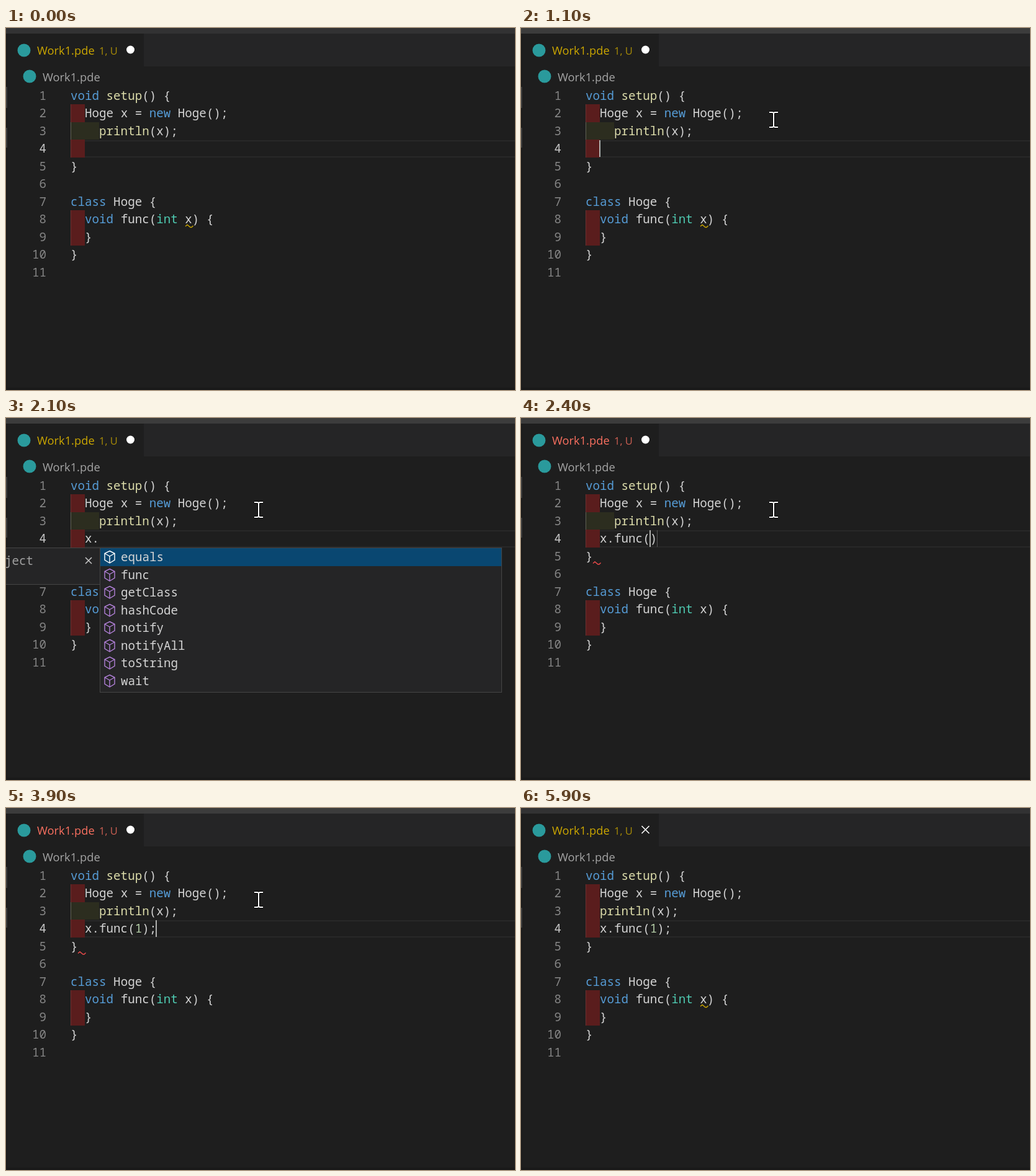
An HTML page with a canvas that plays this animation: 820x584 px, repeating every 6 s.

```html
<!DOCTYPE html>
<html lang="en">
<head>
<meta charset="utf-8">
<title>Code editor</title>
<style>
html, body { margin: 0; width: 100%; height: 100%; overflow: hidden; background: #1e1e1e; }
canvas { display: block; }
</style>
</head>
<body>
<canvas id="stage" width="820" height="584"></canvas>
<script>
const ctx = document.getElementById('stage').getContext('2d');
const LOOP = 6000, LEFT = 104, CHAR = 11.52, ROW = 28.5;
const MONO = '500 19.2px "Noto Sans Mono", monospace';
const UI = '"Open Sans", sans-serif';
const METHODS = ['equals', 'func', 'getClass', 'hashCode', 'notify', 'notifyAll', 'toString', 'wait'];
const TOKENS = /(void|class|new)\b|(setup|println)\b|(int)\b|(\d+)|[\w.]+|\s+|[^\w\s]/g;
const TOKEN_COLORS = ['#569cd6', '#dcdcaa', '#4ec9b0', '#b5cea8'];
const PLAIN = '#d4d4d4';

// Start time, text of line 4, caret column
const TYPING = [
  [0, '', 2],
  [1400, 'x', 3],
  [1500, 'x.', 4],
  [2400, 'x.func()', 9],
  [3200, 'x.func(1)', 10],
  [3800, 'x.func(1);', 12],
];
// Moments that restart the caret blink
const BLINK_STARTS = [900, 1400, 1500, 2400, 3200, 3800, 5000];

const rowTop = n => Math.floor(95 + ROW * (n - 1));
const during = (t, from, to) => t >= from && t < to;

function rect(x, y, w, h, color) {
  ctx.fillStyle = color;
  ctx.fillRect(x, y, w, h);
}

function text(str, x, y, color, font = MONO, align = 'left') {
  ctx.font = font;
  ctx.textAlign = align;
  ctx.fillStyle = color;
  ctx.fillText(str, x, y);
}

function disc(x, y, r, color) {
  ctx.fillStyle = color;
  ctx.beginPath();
  ctx.arc(x, y, r, 0, Math.PI * 2);
  ctx.fill();
}

function stroke(path, color, width) {
  ctx.strokeStyle = color;
  ctx.lineWidth = width;
  ctx.stroke(new Path2D(path));
}

function panel(x, y, w, h) {
  rect(x, y, w, h, '#454545');
  rect(x + 1, y + 1, w - 2, h - 2, '#252526');
}

const cross = (x, y, r, color) =>
  stroke(`M${x - r} ${y - r}l${2 * r} ${2 * r}m0 ${-2 * r}l${-2 * r} ${2 * r}`, color, 1.6);

const squiggle = (x, y, color) =>
  stroke(`M${x} ${y}l3 -2.5l5 4h2l2.5 -2.5`, color, 1.4);

function codeLine(n, str, column = 0) {
  const y = rowTop(n) + 21;
  text(n, 65, y, n === 4 ? '#c6c6c6' : '#858585', MONO, 'right');
  for (const m of str.matchAll(TOKENS)) {
    const kind = m.slice(1).findIndex(Boolean);
    text(m[0], LEFT + (column + m.index) * CHAR, y, TOKEN_COLORS[kind] || PLAIN);
  }
}

function chrome(t, saved, error) {
  const focused = during(t, 900, 5900);
  rect(0, 0, 820, 584, '#1e1e1e');
  rect(0, 0, 820, 9, focused ? '#3c3c3c' : '#323233');
  rect(222, 9, 598, 53, '#252526');
  rect(0, 9, 2, 575, '#191919');
  rect(0, 95, 2, 34, '#3c3c3c');
  rect(0, 161, 2, 32, '#3c3c3c');
  rect(0, 580, 820, 4, '#191919');

  const tabColor = error ? '#fa7060' : '#cca700';
  disc(29, 36, 10.5, '#2a9a9c');
  text('Work1.pde', 50, 43, tabColor, '18.3px ' + UI);
  ctx.globalAlpha = 0.8;
  text('1, U', 150, 43, tabColor, '16.5px ' + UI);
  ctx.globalAlpha = 1;
  if (saved) cross(200.5, 35, 6, '#fff');
  else disc(200.5, 35, 6.5, '#fff');

  disc(38, 78, 10.5, '#2a9a9c');
  text('Work1.pde', 59, 85.5, '#a5a5a5', '18.3px ' + UI);
}

function indent(first, last, width = 23, fill = '#5a1d1d', guide = '#6b3030') {
  const y = rowTop(first), h = rowTop(last + 1) - y;
  rect(LEFT, y, width, h, fill);
  rect(LEFT, y, 1, h, guide);
}

function editor(t, saved, error) {
  const [, typed, column] = TYPING.findLast(step => t >= step[0]);

  rect(LEFT, 181, 716, 2, '#282828');
  rect(LEFT, 207, 716, 2, '#282828');
  indent(2, 4);
  if (!saved) {
    rect(LEFT, rowTop(3), 23, 28, '#1e1e1e');
    indent(3, 3, 46, '#2c2d1f', '#606055');
  }
  indent(8, 9);

  codeLine(1, 'void setup() {');
  codeLine(2, 'Hoge x = new Hoge();', 2);
  codeLine(3, 'println(x);', saved ? 2 : 4);
  codeLine(4, typed, 2);
  codeLine(5, '}');
  codeLine(6, '');
  codeLine(7, 'class Hoge {');
  codeLine(8, 'void func(int x) {', 2);
  codeLine(9, '}', 2);
  codeLine(10, '}');
  codeLine(11, '');

  if (error) squiggle(116, 234.5, '#f14c4c');
  else squiggle(289, 320, '#cca700');

  // End stop of the inserted call
  if (during(t, 2400, 3800)) {
    rect(Math.round(LEFT + (typed.length + 2) * CHAR), 181, 1, 27, '#555');
  }
  const blink = BLINK_STARTS.findLast(start => t >= start);
  if (t < 5900 && (t - blink) % 1000 < 500) {
    rect(Math.round(LEFT + column * CHAR) - 1, 181, 2, 27, '#aeafad');
  }
}

function cube(x, y, color) {
  stroke(`M${x} ${y - 9.5}l8 4v10.5l-8 5l-8 -5v-10.5zM${x - 8} ${y - 5.5}l8 4.5l8 -4.5M${x} ${y - 1}v11`, color, 1.4);
}

function suggestions(x, items, selected) {
  panel(x, 209, 648, Math.round(items.length * ROW) + 6);
  rect(x + 1, 210 + Math.round(selected * ROW), 646, 29, '#094771');
  items.forEach((item, i) => {
    const y = Math.round(224 + i * ROW);
    cube(x + 16, y, i === selected ? '#fff' : '#b180d7');
    text(item, x + 34, y + 7, PLAIN);
  });
}

function popups(t) {
  if (during(t, 1400, 1500)) suggestions(139, ['x'], 0);
  if (!during(t, 1500, 2400)) return;
  if (t >= 1600) {
    panel(-10, 209, 162, 60);
    text('ject', -2, 237, '#a0a0a0');
    cross(133, 230, 5, '#c5c5c5');
  }
  suggestions(151, METHODS, t < 2200 ? 0 : 1);
}

function pointer(t) {
  if (!during(t, 100, 5100)) return;
  const k = Math.min(1, (t - 100) / 650);
  const ease = k * k * (3 - 2 * k);
  const [x, y] = t < 5000 ? [743 - 336 * ease, 521 - 373 * ease] : [484, 507];
  const beam = `M${x - 7} ${y - 12}h5l2 1l2 -1h5M${x} ${y - 11}v22M${x - 7} ${y + 12}h5l2 -1l2 1h5`;
  stroke(beam, '#000', 4);
  stroke(beam, '#fff', 2);
}

function draw() {
  const t = performance.now() % LOOP;
  const saved = t >= 5000, error = during(t, 2200, 5400);
  chrome(t, saved, error);
  editor(t, saved, error);
  popups(t);
  pointer(t);
  requestAnimationFrame(draw);
}
draw();
</script>
</body>
</html>
```
